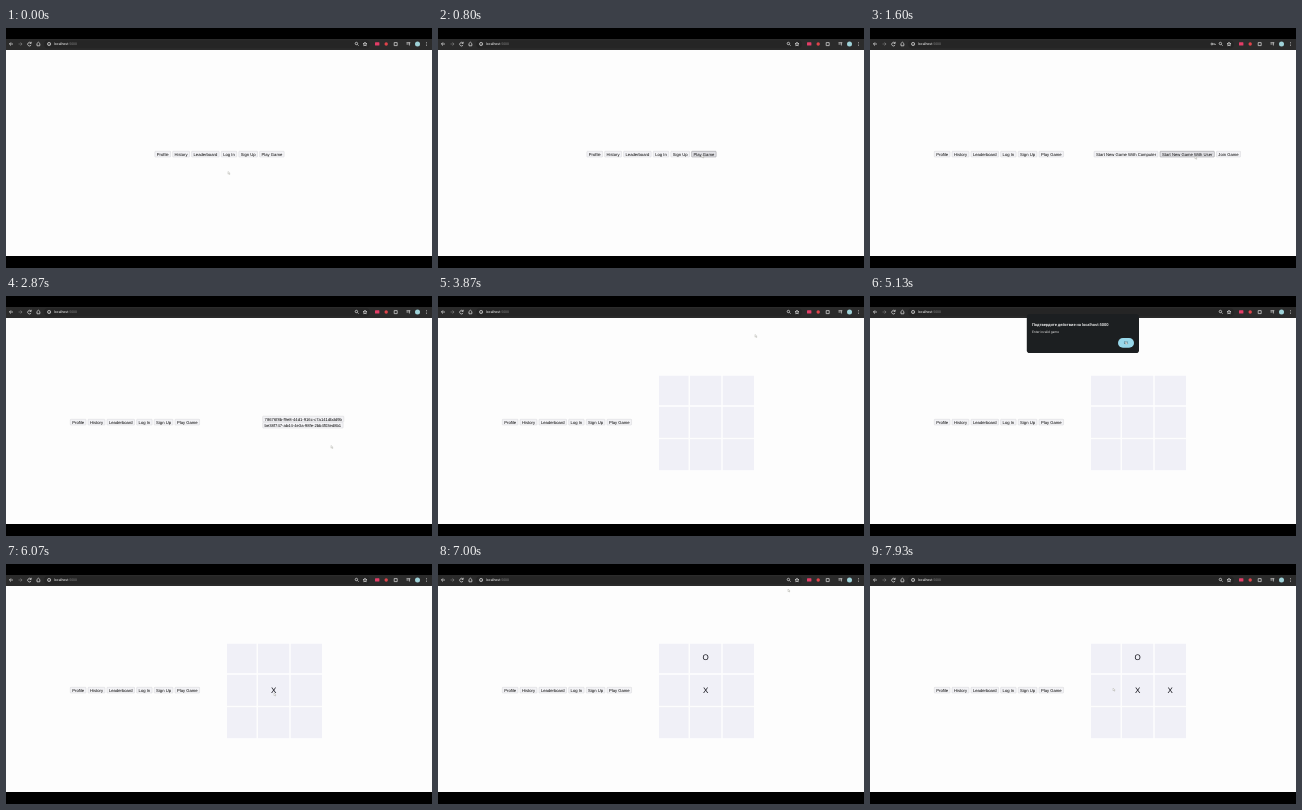
An HTML page that plays this animation: 426 by 240 pixels, repeating every 8000 ms.

```html
<!DOCTYPE html>
<html lang="en">
<head>
<meta charset="utf-8">
<title>Tic-tac-toe session</title>
<style>
html, body { margin: 0; width: 100%; height: 100%; overflow: hidden; background: #000; }
svg { display: block; width: 100vw; height: 100vh; }
text { font-family: "Liberation Sans", Arial, sans-serif; text-rendering: geometricPrecision; }
.ui { font-family: Roboto, "Liberation Sans", sans-serif; }
.icon { fill: none; stroke: #e2e2e2; stroke-width: .7; }
</style>
</head>
<body>
<svg id="stage" viewBox="0 0 426 240" preserveAspectRatio="none"></svg>
<script>
const LOOP = 8000, STEP = 200 / 3;
const stage = document.getElementById('stage');

function add(parent, tag, attrs, content) {
  const el = document.createElementNS('http://www.w3.org/2000/svg', tag);
  for (const key in attrs) el.setAttribute(key, attrs[key]);
  if (content) el.textContent = content;
  parent.appendChild(el);
  return el;
}
const group = () => add(stage, 'g', {});
const rect = (g, x, y, width, height, fill, rx = 0) =>
  add(g, 'rect', { x, y, width, height, fill, rx });
const label = (g, x, y, size, fill, content, more) =>
  add(g, 'text', { x, y, 'font-size': size, fill, ...more }, content);
const dot = (g, cx, cy, r, fill) => add(g, 'circle', { cx, cy, r, fill });
const icon = (g, d) => add(g, 'path', { d, class: 'icon' });

// Browser window
const chrome = group();
rect(chrome, 0, 0, 426, 240, '#000');
rect(chrome, 0, 11, 426, 11, '#2b2b2b');
rect(chrome, 38, 12.2, 326, 8, '#252525', 4);
rect(chrome, 0, 22, 426, 206, '#fdfdfd');
icon(chrome, 'M7 16H3.5M5 14.4L3.4 16L5 17.6');
icon(chrome, 'M12.5 16H16M14.5 14.4L16.1 16L14.5 17.6').setAttribute('opacity', .4);
icon(chrome, 'M25 15.2A1.8 1.8 0 1 0 25.1 17M25.2 13.8V15.4H23.6');
icon(chrome, 'M30.6 15.8L32.4 14.2L34.2 15.8M31 15.8V17.8H33.8V15.8');
icon(chrome, 'M41.5 16a1.6 1.6 0 1 0 3.2 0a1.6 1.6 0 1 0 -3.2 0M43.1 15.6V16.8');
const url = label(chrome, 48, 17.2, 3.5, '#fff', 'localhost', { class: 'ui' });
add(url, 'tspan', { fill: '#858585' }, ':5000');
icon(chrome, 'M349.2 15.5a1.2 1.2 0 1 0 2.4 0a1.2 1.2 0 1 0 -2.4 0M351.3 16.4L352.6 17.7');
icon(chrome, 'M359 14.1L359.6 15.5L361 15.6L359.9 16.5L360.2 17.8L359 17.1L357.8 17.8L358.1 16.5L357 15.6L358.4 15.5Z');
rect(chrome, 369, 14.2, 4.4, 3.4, '#e33d67', .6);
dot(chrome, 380.2, 16, 1.7, '#e0434a');
icon(chrome, 'M388.2 14.6H391.2V17.6H388.2Z');
icon(chrome, 'M400.5 14.7H404.3M400.5 16H402.5M403.4 14.7V17.5');
dot(chrome, 411.5, 16, 2.5, '#9ed2d8');
for (const y of [14.5, 16, 17.5]) dot(chrome, 420.5, y, .45, '#e8e8e8');
const key = icon(group(), 'M341 16a.9 .9 0 1 0 1.8 0a.9 .9 0 1 0 -1.8 0M342.8 16H345.2V17');

// Page buttons
const buttons = [];
function button(g, x, y, content) {
  const box = rect(g, x - 1.9, y - 4.3, 1, 5.7, '#f3f3f6', .6);
  const text = label(g, x, y, 4.2, '#000', content);
  const width = text.getComputedTextLength();
  box.setAttribute('width', width + 3.8);
  box.setAttribute('stroke-width', .4);
  buttons.push({ g, box, x: x - 1.9, y: y - 4.3, w: width + 3.8 });
  return width;
}
function row(g, x, names) {
  for (const name of names) x += button(g, x, 127.6, name) + 5.9;
}
const nav = group(), modes = group(), games = group(), board = group();
row(nav, 66.2, ['Profile', 'History', 'Leaderboard', 'Log In', 'Sign Up', 'Play Game']);
row(modes, 226, ['Start New Game With Computer', 'Start New Game With User', 'Join Game']);
button(games, 258.6, 124.5, '78676f8b-f9e8-44d1-916c-c7a141dbdd9b');
button(games, 258.6, 130.6, 'be38f747-ab44-4e3a-98fe-2bb4f03ed8b1');

// Board
const cols = [[221, 29.5], [252, 31.2], [284.8, 31.2]];
const rows = [[79.7, 29.5], [110.8, 31], [143.2, 31]];
for (const [y, h] of rows) for (const [x, w] of cols) rect(board, x, y, w, h, '#f0f0f7');
const mark = (x, y, sign, from) => ({
  from,
  el: label(board, x, y, 8, '#0c0c14', sign, { 'text-anchor': 'middle' })
});
const marks = [mark(267.6, 129.2, 'X', 5930), mark(267.6, 96.4, 'O', 6530), mark(300.2, 129.2, 'X', 7530)];

// Alert
const alertBox = group();
rect(alertBox, 156.8, 18, 112.2, 39, '#1c1f21', 2.8);
label(alertBox, 162, 29.7, 4, '#fff', 'Подтвердите действие на localhost:5000', { class: 'ui', 'font-weight': 500 });
label(alertBox, 162, 37.2, 3.3, '#e2e2e2', 'Enter invalid game', { class: 'ui' });
rect(alertBox, 248, 42, 16, 9.8, '#98d8ea', 4.9);
label(alertBox, 256, 48.2, 3.6, '#15394a', 'OK', { class: 'ui', 'text-anchor': 'middle' });

const pointer = add(group(), 'path', {
  d: 'M0 0V2.7L.7 2.1L1.2 3.1L1.7 2.9L1.2 1.9H2.1Z',
  fill: '#fff', stroke: '#a8a8a0', 'stroke-width': .4
});

// Pointer stops: time, x, y
const stops = [
  [0, 222, 143.5], [250, 222, 143.5], [750, 264, 127], [950, 264, 127], [1450, 325, 128.3],
  [1650, 325, 128.3], [2050, 356, 127], [2350, 356, 127], [2750, 325, 149.5], [2950, 325, 149.5],
  [3250, 310, 130], [3450, 310, 130], [3800, 317, 38.5], [4200, 317, 38.5],
  [4800, 255.5, 45.5], [5330, 255.5, 45.5], [5800, 268, 129], [6100, 268, 129], [6800, 350, 25],
  [7050, 350, 25], [7450, 301, 129], [7600, 301, 129], [7900, 241, 124], [8000, 241, 124]
];
function pointerAt(t) {
  const i = stops.findIndex(s => s[0] > t);
  const [t0, x0, y0] = stops[i - 1], [t1, x1, y1] = stops[i];
  const p = (t - t0) / (t1 - t0), e = p * p * (3 - 2 * p);
  return [x0 + (x1 - x0) * e, y0 + (y1 - y0) * e];
}

const show = (el, on) => el.setAttribute('display', on ? 'inline' : 'none');

function render(time) {
  const t = Math.floor((time % LOOP) / STEP + .01) * STEP % LOOP;
  const within = (a, b) => t >= a && t < b;
  const shift = t < 860 ? 84.6 : 0;
  const [px, py] = pointerAt(t);
  nav.setAttribute('transform', `translate(${shift} 0)`);
  show(modes, within(860, 2260));
  show(key, within(860, 2260));
  show(games, within(2260, 3390));
  show(board, t >= 3390);
  show(alertBox, within(4330, 5260));
  for (const m of marks) show(m.el, t >= m.from);
  for (const b of buttons) {
    const x = b.x + (b.g === nav ? shift : 0);
    const over = px > x && px < x + b.w && py > b.y && py < b.y + 5.7;
    b.box.setAttribute('fill', over ? '#e2e2e6' : '#f3f3f6');
    b.box.setAttribute('stroke', over ? '#77777d' : '#c9c9cf');
  }
  pointer.setAttribute('transform', `translate(${px} ${py})`);
}

let start;
function tick(now) {
  start ??= now;
  render(now - start);
  requestAnimationFrame(tick);
}
render(0);
requestAnimationFrame(tick);
</script>
</body>
</html>
```
